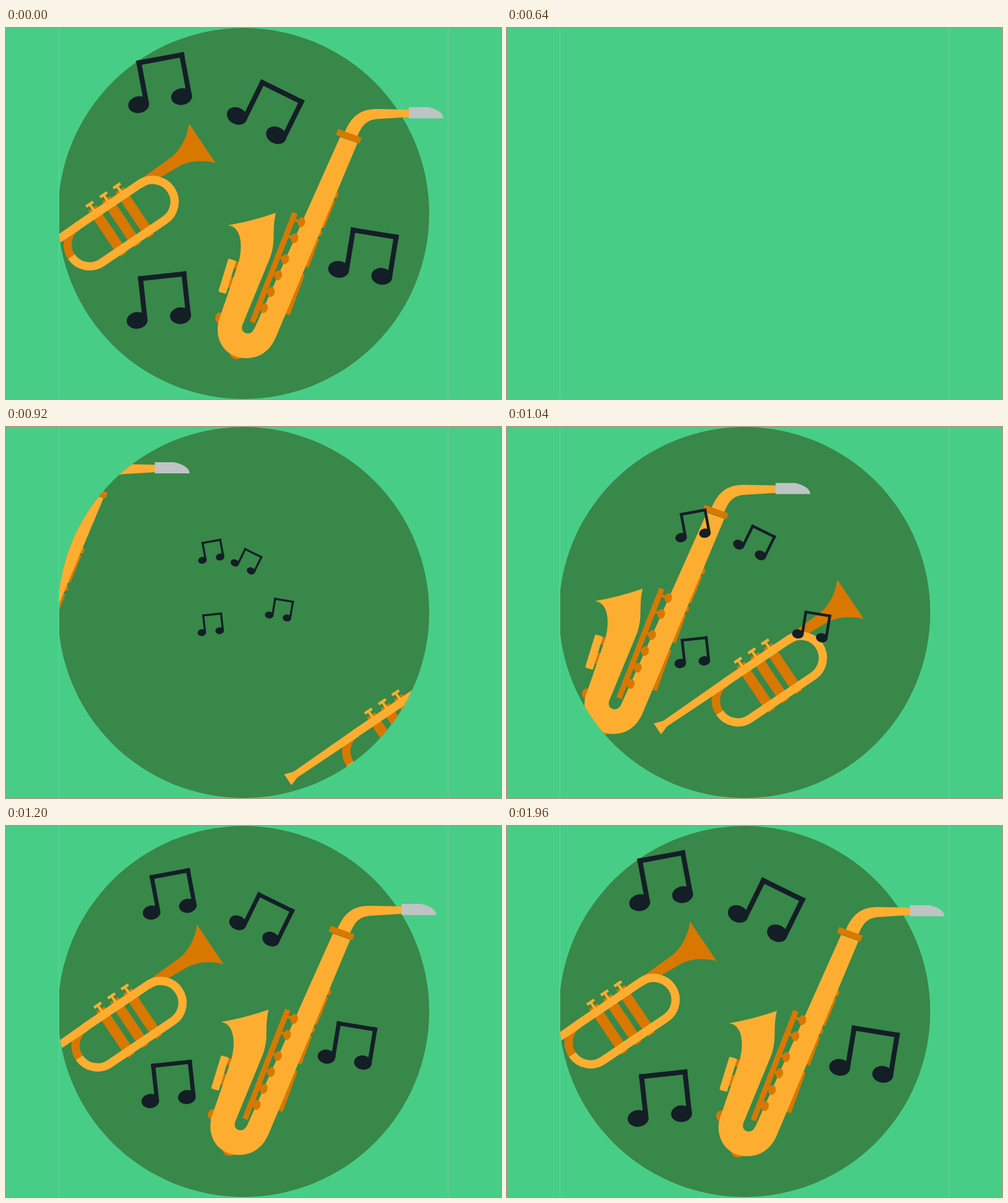
Recreate the animation shown at these times as an HTML page with a canvas. Size 800 by 600 pixels, loop 2 s.

```html
<!DOCTYPE html>
<html lang="en">
<head>
<meta charset="utf-8">
<title>Brass notes</title>
<style>
html, body { margin: 0; width: 100%; height: 100%; overflow: hidden; background: #48cd87; }
canvas { display: block; }
</style>
</head>
<body>
<canvas id="stage" width="800" height="600"></canvas>
<script>
const ctx = document.getElementById('stage').getContext('2d');
const LOOP = 2000, STEP = 40, TAU = Math.PI * 2;
const GREEN = '#48cd87', DISC = '#388849', GOLD = '#fdae31', AMBER = '#d87800';
const SILVER = '#bec4c4', INK = '#141e27';
const center = { x: 384, y: 300, r: 300 };

// Eased progress between two times
function ease(t, from, to) {
  const u = Math.min(1, Math.max(0, (t - from) / (to - from)));
  return u * u * (3 - 2 * u);
}

function shape(color, d) {
  ctx.fillStyle = color;
  ctx.fill(new Path2D(d));
}

function line(color, width, x1, y1, x2, y2) {
  ctx.strokeStyle = color;
  ctx.lineWidth = width;
  ctx.beginPath();
  ctx.moveTo(x1, y1);
  ctx.lineTo(x2, y2);
  ctx.stroke();
}

function oval(color, x, y, rx, ry = rx, angle = 0) {
  ctx.fillStyle = color;
  ctx.beginPath();
  ctx.ellipse(x, y, rx, ry, angle, 0, TAU);
  ctx.fill();
}

function box(color, x, y, w, h) {
  ctx.fillStyle = color;
  ctx.fillRect(x, y, w, h);
}

function placed(x, y, degrees, scale, draw) {
  ctx.save();
  ctx.translate(x, y);
  ctx.rotate(degrees * Math.PI / 180);
  ctx.scale(scale, scale);
  draw();
  ctx.restore();
}

function clipped(openRight, draw) {
  ctx.save();
  ctx.beginPath();
  ctx.arc(center.x, center.y, center.r, 0, TAU);
  if (openRight) ctx.rect(center.x, 0, 400, 600);
  ctx.clip();
  draw();
  ctx.restore();
}

function trumpet() {
  // Bell and its pipe
  shape(AMBER, 'M60 -41 L126 -43 C146 -44 166 -55 181 -72 L181 5 C166 -12 146 -23 126 -24 L60 -28 Z');

  for (const x of [-25, 2, 28]) {
    box(AMBER, x - 8.5, -32, 17, 64);
    box(AMBER, x - 8, -46, 16, 6);
    box(AMBER, x - 6, 38, 12, 6.5);
    box(GOLD, x - 2, -54, 4, 13);
    box(GOLD, x - 7, -56, 14, 4.5);
  }

  // Looped tube with a darker quarter bend
  ctx.lineWidth = 13.5;
  ctx.strokeStyle = AMBER;
  ctx.beginPath();
  ctx.arc(-61.5, 0, 35.5, Math.PI, Math.PI * 1.5);
  ctx.stroke();
  ctx.strokeStyle = GOLD;
  ctx.beginPath();
  ctx.moveTo(-62, -35.5);
  ctx.lineTo(61.5, -35.5);
  ctx.arc(61.5, 0, 35.5, -Math.PI / 2, Math.PI / 2);
  ctx.lineTo(-61.5, 35.5);
  ctx.arc(-61.5, 0, 35.5, Math.PI / 2, Math.PI);
  ctx.stroke();
  shape(GOLD, 'M-195 -45 L-180 -40 L-60 -42 V-28.5 L-180 -29 L-195 -24 Z');
}

function saxophone() {
  // Parts tucked behind the body
  oval(AMBER, 346, 469, 8, 9);
  oval(AMBER, 373, 526, 11, 10);
  oval(AMBER, 531, 270, 6);
  oval(AMBER, 505, 331, 6);
  line(AMBER, 9, 528, 278, 510, 322);
  line(AMBER, 9, 502, 340, 485, 386);
  line(AMBER, 10, 478, 397, 454, 463);
  line(AMBER, 12, 364, 381, 378, 385);
  line(AMBER, 18, 358, 410, 372, 414);

  // Neck and mouthpiece
  shape(GOLD, 'M546 172 C556 146 570 131 599 131 L652 132 V144 L603 147 C582 148 575 157 566 180 Z');
  shape(SILVER, 'M651 128 H682 C696 131 707 137 707 146 H651 Z');

  // Body, bend and bell
  shape(GOLD, `M540 176 L568 186 L437 498 C427 523 409 534 388 534
    C360 534 342 513 342 488 C342 478 344 472 347 464 L376 379
    C382 358 383 322 359 319 Q399 312 436 299
    C429 332 437 343 427 371 L383 478 C378 489 385 494 391 494 C397 494 400 489 402 485 Z`);
  line(AMBER, 10, 535, 168, 573, 182);

  // Key rod and keys
  line(AMBER, 9, 467, 299, 398, 476);
  for (const y of [314, 340, 374, 400, 427, 453]) {
    const x = 477.5 - (y - 314) * 0.435;
    line(AMBER, 5, x - 12, y - 4, x, y);
    oval(AMBER, x, y, 6, 8, 0.25);
  }

  placed(357.5, 401.5, 17, 1, () => {
    ctx.fillStyle = GOLD;
    ctx.beginPath();
    ctx.roundRect(-6.5, -28, 13, 56, 2);
    ctx.fill();
  });
}

function note() {
  oval(INK, -35.3, 28, 17, 13.5);
  oval(INK, 35.3, 28, 17, 13.5);
  box(INK, -26.5, -42.5, 8, 69);
  box(INK, 44, -42.5, 8, 69);
  box(INK, -26.5, -42.5, 78.5, 8);
}

const notes = [
  { x: 244, y: 90, tilt: -10.6 },
  { x: 417.4, y: 132.7, tilt: 26.2 },
  { x: 577, y: 368.4, tilt: 9.3 },
  { x: 244, y: 441.2, tilt: -6.2 }
];

function render(t) {
  box(GREEN, 0, 0, 800, 600);
  box('#60d898', 85, 0, 1, 600);
  box('#7acd9c', 714, 0, 1, 600);

  const settled = t < 640;
  const at = (from, to) => settled ? 1 : ease(t, from, to);
  const grow = at(640, 840), away = 1 - at(800, 1240), spread = at(640, 1360);
  const size = 0.4 * at(640, 880) + 0.6 * at(880, 1360);

  ctx.save();
  ctx.beginPath();
  ctx.rect(86, 0, 628, 600);
  ctx.clip();
  if (grow > 0) oval(DISC, center.x, center.y, center.r * grow);

  if (away < 1) {
    clipped(false, () => placed(186 + 551 * away, 315.5 + 213.5 * away, -34, 1, trumpet));
    clipped(true, () => placed(-502 * away, -87 * away, 0, 1, saxophone));
  }
  if (size > 0) {
    for (const n of notes) {
      placed(373 + (n.x - 373) * spread, 258 + (n.y - 258) * spread, n.tilt, size, note);
    }
  }
  ctx.restore();
}

const start = performance.now();
function tick() {
  const t = (performance.now() - start) % LOOP;
  render(Math.floor(t / STEP) * STEP);
  requestAnimationFrame(tick);
}
tick();
</script>
</body>
</html>
```
